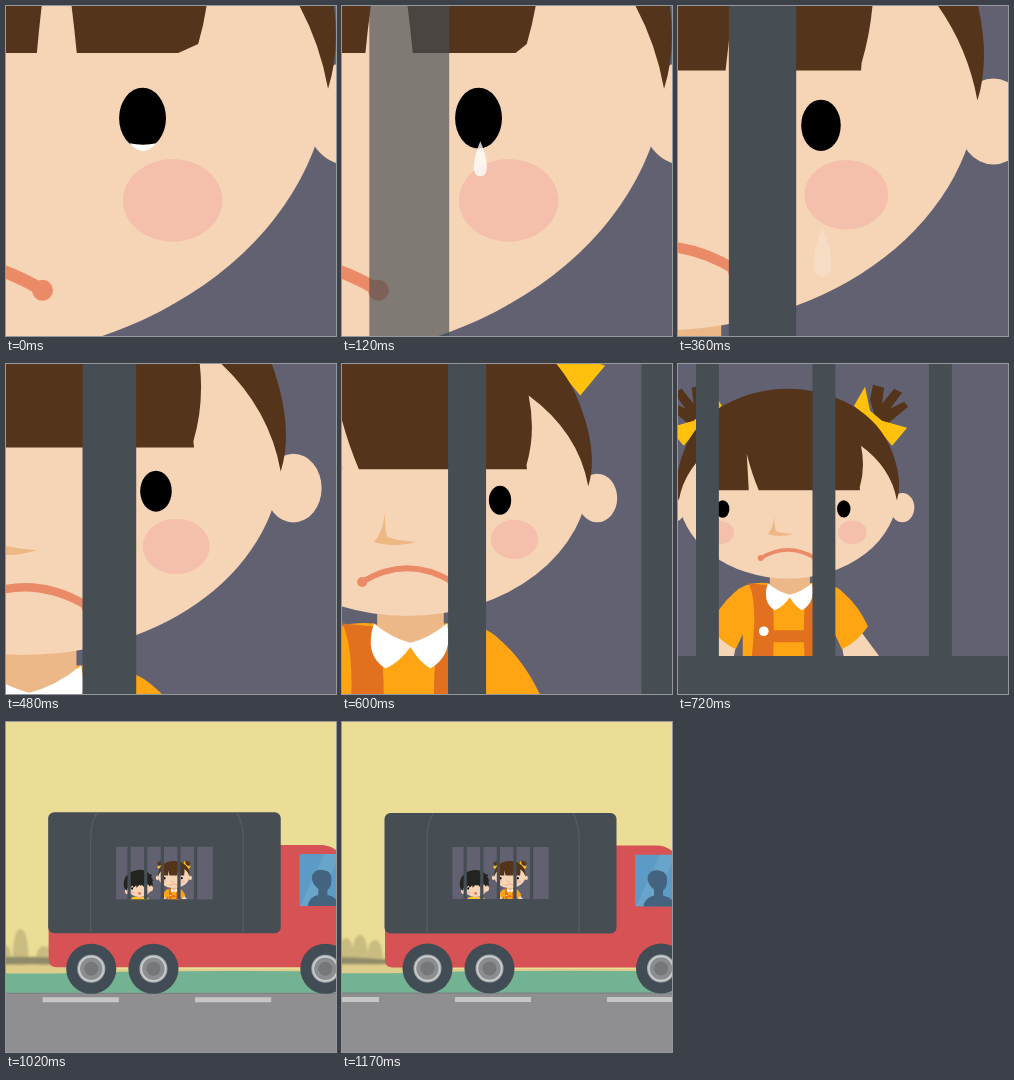
Animation of 330 by 330 pixels, one loop 1200 ms. Source, as an HTML page:

```html
<!DOCTYPE html>
<html>
<head>
<meta charset="utf-8">
<style>
  html, body { margin: 0; height: 100%; overflow: hidden; background: #464e54; }
  svg { display: block; width: 100vw; height: 100vh; }
</style>
</head>
<body>
<svg viewBox="0 0 330 330">
  <defs>
    <clipPath id="window"><rect x="110.4" y="124.9" width="96.3" height="52.2"/></clipPath>
    <clipPath id="cabGlass"><path d="M293 132H345V184H293Z"/></clipPath>
    <filter id="soft"><feGaussianBlur stdDeviation="1.2"/></filter>

    <g id="wheel">
      <circle r="25" fill="#414c54"/>
      <circle r="14" fill="#a9acae"/>
      <circle r="12" fill="#8b8e90" stroke="#cfd0d0" stroke-width="1.5"/>
      <circle r="7" fill="#74787b"/>
    </g>

    <g id="pigtail">
      <path fill="#54341a" d="M199 60 192 36 195 21 206 24 204 40 216 25 224 29 212 45 226 38 230 43 207 62Z"/>
      <path fill="#ffc10d" d="M187 23 192 47 204 57 229 64 214 82 199 64 176 42Z"/>
    </g>

    <g id="girlSide">
      <path fill="#f6d4b6" d="M160 262 176 258 202 293H166Z"/>
      <path fill="#ffa514" d="M108 228 132 219Q154 217 166 229Q180 241 190 262Q180 277 164 285L157 270V300H108Z"/>
      <path fill="#e1711f" d="M130 221 151 219Q141 240 149 300H127Q124 245 130 221Z"/>
    </g>
  </defs>

  <g id="scene">
    <g id="outside">
      <rect x="-50" y="-50" width="430" height="330" fill="#ebdc96"/>
      <path fill="#dfcd8c" d="M-10 240Q40 238 90 247H340V260H-10Z"/>
      <g id="trees" fill="#c9bc80" filter="url(#soft)"></g>
      <path fill="#74b294" d="M-10 251Q50 252 100 250T340 249V272H-10Z"/>
      <rect x="-50" y="271" width="430" height="110" fill="#8f8f91"/>
      <rect x="-50" y="270.5" width="430" height="1.2" fill="#7f8383"/>
      <path id="dashes" d="M-571 277.5H900" stroke="#c6c6c6" stroke-width="5" stroke-dasharray="76 76"/>

      <g id="truck">
        <path fill="#d65254" d="M43 200H270V123H314Q326 123 334 132L350 170V245H51Q43 245 43 237Z"/>
        <g clip-path="url(#cabGlass)">
          <rect x="293" y="132" width="52" height="52" fill="#5b9bc5"/>
          <path fill="#78b0d2" d="M318 132H334L310 184H294Z" opacity=".5"/>
          <path fill="#44637f" d="M301 186Q302 175 312 173V167Q304 161 306 153Q309 147 317 148Q326 149 325 159Q325 165 321 168V173Q332 175 334 186Z"/>
        </g>
        <rect x="42.5" y="90.5" width="232" height="120.5" rx="6" fill="#464e54"/>
        <path d="M91 91Q85 102 85 116V211M231 91Q237 102 237 116V211" fill="none" stroke="#635f60"/>
      </g>
      <use href="#wheel" x="85.5" y="246.5"/>
      <use href="#wheel" x="147.5" y="246.5"/>
      <use href="#wheel" x="319" y="246.5"/>
    </g>

    <g clip-path="url(#window)">
      <rect x="110" y="124" width="98" height="54" fill="#616171"/>

      <g transform="translate(111.27 99.05) scale(.3731)">
        <path fill="#ffc20e" d="M35 212Q37 204 49 202H72Q84 204 87 212Z"/>
        <path fill="#edb784" d="M52 198H69L66 207H55Z"/>
        <ellipse cx="27" cy="188" rx="6" ry="7.5" fill="#f6d4b6"/>
        <ellipse cx="90" cy="181" rx="6" ry="7.5" fill="#f6d4b6"/>
        <ellipse cx="59" cy="178" rx="32" ry="25" fill="#f6d4b6"/>
        <path fill="#23231f" d="M25 187Q15 177 18 162Q23 134 56 131Q76 130 86 142L94 144 91 149 97 160 94 161 96 174 90 171 88 177 82 169 79 175 73 169 73 178 66 171 64 174 60 171 52 179 51 172 44 179 41 173 33 181 30 176Z"/>
        <ellipse cx="40" cy="180.5" rx="2.5" ry="3.4"/>
        <ellipse cx="76" cy="179" rx="2.5" ry="3.4"/>
        <ellipse cx="41" cy="192" rx="5.5" ry="4.3" fill="#f4c0ab"/>
        <ellipse cx="80" cy="189" rx="5.5" ry="4.3" fill="#f4c0ab"/>
        <ellipse cx="60" cy="194" rx="4" ry="3.8" fill="#e77a5b"/>
      </g>

      <g transform="translate(152.143 135.429) scale(.142857)">
        <use href="#pigtail"/>
        <use href="#pigtail" transform="matrix(-1 0 0 1 220 0)"/>
        <use href="#girlSide"/>
        <use href="#girlSide" transform="matrix(-1 0 0 1 222 0)"/>
        <path fill="#e1711f" d="M76 266H146V278H76Z"/>
        <circle cx="86" cy="267" r="4.8" fill="#fff"/>
        <circle cx="141" cy="267" r="4.8" fill="#fff"/>
        <path fill="#edb888" d="M92 200H132V225L112 234 92 225Z"/>
        <path fill="#fff" d="M90 219Q101 228 112 230.5Q123 228 134 219Q138 238 124 246Q117 242 112 233Q106 242 97 246Q84 238 90 219Z"/>

        <ellipse cx="-4.2" cy="143.6" rx="12" ry="14.6" fill="#f6d4b6"/>
        <ellipse cx="224.2" cy="143.6" rx="12" ry="14.6" fill="#f6d4b6"/>
        <ellipse cx="110" cy="130" rx="109.2" ry="84.4" fill="#f6d4b6"/>
        <path id="hair" fill="#54341a"/>
        <ellipse cx="42" cy="168.4" rx="14.2" ry="11.7" fill="#f4c0ab"/>
        <ellipse cx="174.4" cy="168.4" rx="14.2" ry="11.8" fill="#f4c0ab"/>
        <path fill="#edb884" d="M97 149Q96 164 90 170Q102 174 115.4 170Q103 169 98 167Q96 160 97 149Z"/>
        <path d="M83 194Q110 177.5 137.2 194" fill="none" stroke="#eb8a66" stroke-width="3.6"/>
        <circle cx="83" cy="194" r="3" fill="#eb8a66"/>
        <circle cx="137.2" cy="194.1" r="3" fill="#eb8a66"/>
        <ellipse cx="45" cy="145" rx="6.7" ry="8.7"/>
        <ellipse cx="165.8" cy="144.9" rx="6.7" ry="8.7"/>
        <path id="well" fill="#fff" d="M162 152.1Q166 152.9 169.8 152.1Q166 156.4 162 152.1Z"/>
        <path id="tear" fill="#fff" d="M0 0Q3.1 7 3.1 12.5Q3 16.7 0 16.7Q-3 16.7-3.1 12.5Q-3 7 0 0Z"/>
      </g>
      <path id="bars" d="M123.2 120V180M139.8 120V180M156.4 120V180M173 120V180M189.6 120V180" stroke="#464e54" stroke-width="3.26"/>
    </g>
  </g>
</svg>
<script>
const LOOP = 1200, STEP = 30;
const FOCUS = { x: 177.5, y: 158 };
const el = id => document.getElementById(id);
const clamp = v => Math.max(0, Math.min(1, v));
const move = (id, x, y) => el(id).setAttribute('transform', `translate(${x} ${y})`);

// Each tree: x, top
const trees = [[-2, 222], [15, 207], [38, 224], [49, 216], [63, 213], [78, 218], [96, 220]];
el('trees').innerHTML = trees.map(([x, top]) =>
  `<path d="M${x - 8} 243Q${x - 8} ${top} ${x} ${top}T${x + 8} 243Z"/>`).join('') +
  '<path d="M-30 236Q20 232 110 239V242H-30Z" fill="#8f8a68"/>';

// sway shifts the fringe, tip is the x of its lower right corner
function hairPath(sway, tip) {
  return `M218.8 136.5Q225 117 214 88C200 48 155 25 110 25C65 25 20 48 6 88Q-5 117 1.2 136.5
    Q7 104 37 82Q32 104 38 126.3H71L69 90Q74 110 81 126.3H${135.6 + sway}Q${137.5 + sway} 105 141 85
    Q145 105 147 126.3H${tip}L${181.7 + sway} 123.7Q${187.5 + sway} 104 183 82Q213 104 218.8 136.5Z`;
}

function draw(t) {
  const zoom = clamp((t - 120) / 906);
  const s = 1 + 23.5 * (1 + Math.cos(Math.PI * zoom)) / 2;
  el('scene').setAttribute('transform',
    `translate(${FOCUS.x * (1 - s)} ${FOCUS.y * (1 - s)}) scale(${s})`);
  // The truck zooms around a slightly higher point than the cell.
  move('outside', 0, 2.6 * (1 - 1 / s));

  el('bars').setAttribute('opacity', clamp((t - 60) / 90));
  const turn = clamp(t / 480);
  el('hair').setAttribute('d', hairPath(-3 * Math.sin(Math.PI * turn), 176 + 6 * turn ** 2));

  el('well').setAttribute('opacity', 1 - clamp((t - 60) / 60));
  const grow = clamp((t - 30) / 150);
  const fall = 148 + 14 * (t / 240) ** 2;
  el('tear').setAttribute('transform', `translate(166.3 ${fall}) scale(${grow})`);
  el('tear').setAttribute('opacity', .78 * (1 - clamp((t - 270) / 120)));

  move('truck', 0, .5 * Math.sin(Math.PI / 2 * clamp((t - 1020) / 150)));
  move('trees', -.3 * (t - 1020), 0);
  move('dashes', -((t - 1020) * 152 / 300 % 152), 0);
}

function tick() {
  draw(Math.floor(performance.now() % LOOP / STEP) * STEP);
  requestAnimationFrame(tick);
}
tick();
</script>
</body>
</html>
```
